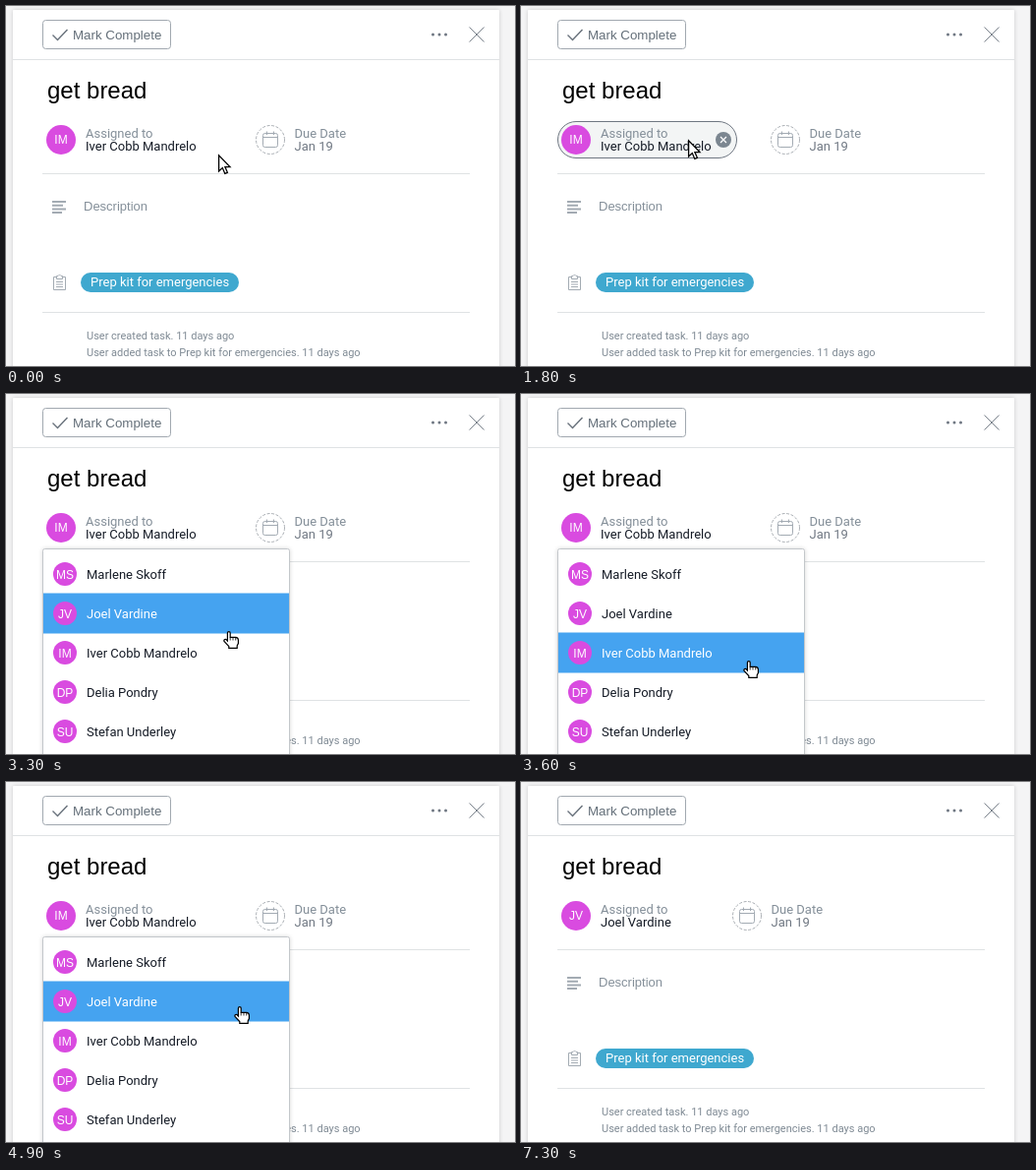
An HTML page for the animation above (9.4 s loop, 518x366 px).

```html
<!DOCTYPE html>
<html lang="en">
<head>
<meta charset="utf-8">
<title>Assign a task</title>
<style>
  html, body { margin: 0; width: 100%; height: 100%; overflow: hidden; background: #f4f4f5; }
  svg { display: block; width: 518px; height: 366px; }
  text { font: 13px Roboto, sans-serif; fill: #151b26; }
  .arial { font-family: "Liberation Sans", Arial, sans-serif; }
  .gray { fill: #848f99; }
  .small { font-size: 11px; fill: #7f8a94; }
  .white { fill: #fff; }
  .initials { font: 12px "Liberation Sans", Arial, sans-serif; fill: #fff; text-anchor: middle; }
  .rule { stroke: #dfe2e4; }
  .icon { fill: none; stroke: #a3abb3; }
  .avatar { fill: #d94be0; }
  .drop { filter: drop-shadow(0 0 2px rgba(0, 0, 0, .16)); }
</style>
</head>
<body>
<svg viewBox="0 0 518 366">
  <rect class="drop" x="7" y="4" width="495" height="370" rx="1" fill="#fff"/>
  <path class="rule" d="M7 54.5H502M37 170.5H472M37 311.5H472"/>

  <rect x="37.5" y="14.5" width="130" height="29" rx="3" fill="#fff" stroke="#a1a8b0"/>
  <path d="M47.5 29.5L52.5 34.5L62.5 24" fill="none" stroke="#68717b" stroke-width="1.4"/>
  <text class="arial" x="68" y="34" style="font-size:13.333px;fill:#646f79">Mark Complete</text>
  <g fill="#6f7782">
    <circle cx="434.5" cy="29" r="1.5"/><circle cx="441" cy="29" r="1.5"/><circle cx="447.5" cy="29" r="1.5"/>
  </g>
  <path d="M471.5 21.5L486.5 36.5M486.5 21.5L471.5 36.5" stroke="#7b838c"/>

  <rect id="titleBox" x="32.5" y="65.5" width="444" height="41" rx="2" fill="none" stroke="#d3d9de"/>
  <text class="arial" x="42" y="94" style="font-size:24px;fill:#000">get bread</text>

  <g id="pill">
    <rect x="37.5" y="117.5" width="182" height="37" rx="18.5" fill="#f3f5f5" stroke="#6f7782"/>
    <circle cx="206" cy="136" r="8" fill="#7b8690"/>
    <path d="M203 133l6 6M209 133l-6 6" stroke="#fff" stroke-width="1.2"/>
  </g>
  <circle class="avatar" cx="56" cy="136" r="15"/>
  <text id="initials" class="initials" x="56" y="140"></text>
  <text class="gray" x="81" y="134">Assigned to</text>
  <text id="assignee" x="81" y="147"></text>

  <g id="due">
    <circle cx="269" cy="136" r="14.5" fill="none" stroke="#a9aeb3" stroke-dasharray="3 1.6"/>
    <rect class="icon" x="261.5" y="129.5" width="15" height="14" rx="2"/>
    <path class="icon" d="M261.5 133.5H276.5M265.5 127.5V131M272.5 127.5V131"/>
    <text class="gray" x="293.5" y="134">Due Date</text>
    <text x="293.5" y="147" style="fill:#6f7782">Jan 19</text>
  </g>

  <path class="icon" stroke-width="2" d="M47 199H61M47 202.7H58M47 206.4H61M47 210H57"/>
  <text class="arial gray" x="79" y="208">Description</text>

  <path class="icon" d="M51.5 275.5H48.5V288.5H60.5V275.5H57.5M51.5 274.5H53L54.5 273L56 274.5H57.5V277.5H51.5ZM51 280.5H58M51 283H58M51 285.5H58"/>
  <rect x="76" y="271" width="161" height="20" rx="10" fill="#3fa8cf"/>
  <text class="white" x="86" y="285">Prep kit for emergencies</text>

  <text class="small" x="82" y="339">User created task. 11 days ago</text>
  <text class="small" x="82" y="356">User added task to Prep kit for emergencies. 11 days ago</text>

  <g id="menu">
    <rect class="drop" x="37.5" y="157.5" width="251" height="240" rx="2" fill="#fff" stroke="#c3c7cb"/>
    <rect id="mark" x="38" width="250" height="41" fill="#45a3f0"/>
    <g id="rows"></g>
  </g>

  <path id="arrow" d="M.6.8V17L4.3 13.6L6.8 19.4L9.4 18.3L6.9 12.6H12Z" fill="#fff" stroke="#000" stroke-width="1.3"/>
  <g id="hand" fill="#fff" stroke="#000" stroke-width="1.2">
    <path d="M4.4 10V2a1.4 1.4 0 0 1 2.8 0V6.3H12.6Q15.4 6.6 15.4 9V12.5L14.2 15V17.3H5.8V15.6L1 10.4a1.4 1.4 0 0 1 2-1.8Z"/>
    <path d="M7.2 6.5V9.5M10 6.5V9.5M12.7 7V9.5" stroke-width=".8"/>
  </g>
</svg>
<script>
const LOOP = 9400, STEP = 100, ROW = 40, TOP = 163;
const people = ["Marlene Skoff", "Joel Vardine", "Iver Cobb Mandrelo", "Delia Pondry", "Stefan Underley"];
const $ = id => document.getElementById(id);

const linear = p => p;
const easeIn = p => p ** 3;
const easeOut = p => 1 - (1 - p) ** 1.5;

// Pointer moves: begin, end, and the place reached
const home = { x: 216, y: 151 };
const moves = [
  { from: 500, to: 800, x: 119, y: 85 },
  { from: 1000, to: 1400, x: 159, y: 136, ease: easeIn },
  { from: 1700, to: 1800, x: 170, y: 136 },
  { from: 2100, to: 2400, x: 154, y: 133 },
  { from: 2600, to: 2800, x: 208, y: 163 },
  { from: 2900, to: 3600, x: 226, y: 271, ease: easeOut },
  { from: 3700, to: 4000, x: 225, y: 300 },
  { from: 4500, to: 4700, x: 232, y: 242 },
  { from: 4800, to: 4900, x: 232, y: 228 },
  { from: 5700, to: 5800, x: 236, y: 224 },
  { from: 7000, to: 7200, x: 134, y: 264 }
];

function pointer(t) {
  let { x, y } = home;
  for (const { from, to, ease = linear, ...end } of moves) {
    if (t <= from) break;
    const p = ease(Math.min(1, (t - from) / (to - from)));
    x += (end.x - x) * p;
    y += (end.y - y) * p;
  }
  return { x: Math.round(x), y: Math.round(y) };
}

const within = (t, a, b) => t >= a && t < b;
const show = (id, on) => $(id).setAttribute("display", on ? "inline" : "none");
const shift = (id, x, y) => $(id).setAttribute("transform", `translate(${x} ${y})`);
const initials = name => name[0] + name.split(" ").pop()[0];

$("rows").innerHTML = people.map((name, i) => {
  const y = TOP + ROW * (i + .5);
  return `<circle class="avatar" cx="60" cy="${y}" r="12"/>
    <text class="initials" x="60" y="${y + 5}">${initials(name)}</text>
    <text class="name" x="82" y="${y + 5}">${name}</text>`;
}).join("");
const names = document.querySelectorAll(".name");

function draw(time) {
  const t = Math.floor(time / STEP) * STEP;
  const { x, y } = pointer(t);
  const pointing = within(t, 2800, 5800);
  const row = pointing ? Math.floor((y - TOP) / ROW) : -1;
  const assigned = t >= 5500;
  const who = people[assigned ? 1 : 2];

  show("titleBox", within(t, 700, 1200));
  show("pill", within(t, 1400, 2800));
  show("menu", within(t, 2200, 5500));
  show("mark", pointing);
  $("mark").setAttribute("y", TOP + ROW * row - .5);
  names.forEach((el, i) => el.classList.toggle("white", i === row));

  $("assignee").textContent = who;
  $("initials").textContent = initials(who);
  shift("due", assigned ? -39 : 0, 0);

  show("hand", pointing);
  show("arrow", !pointing && t < 7300);
  shift("hand", x, y);
  shift("arrow", x, y);
}

const start = performance.now();
function tick() {
  draw((performance.now() - start) % LOOP);
  requestAnimationFrame(tick);
}
tick();
</script>
</body>
</html>
```
